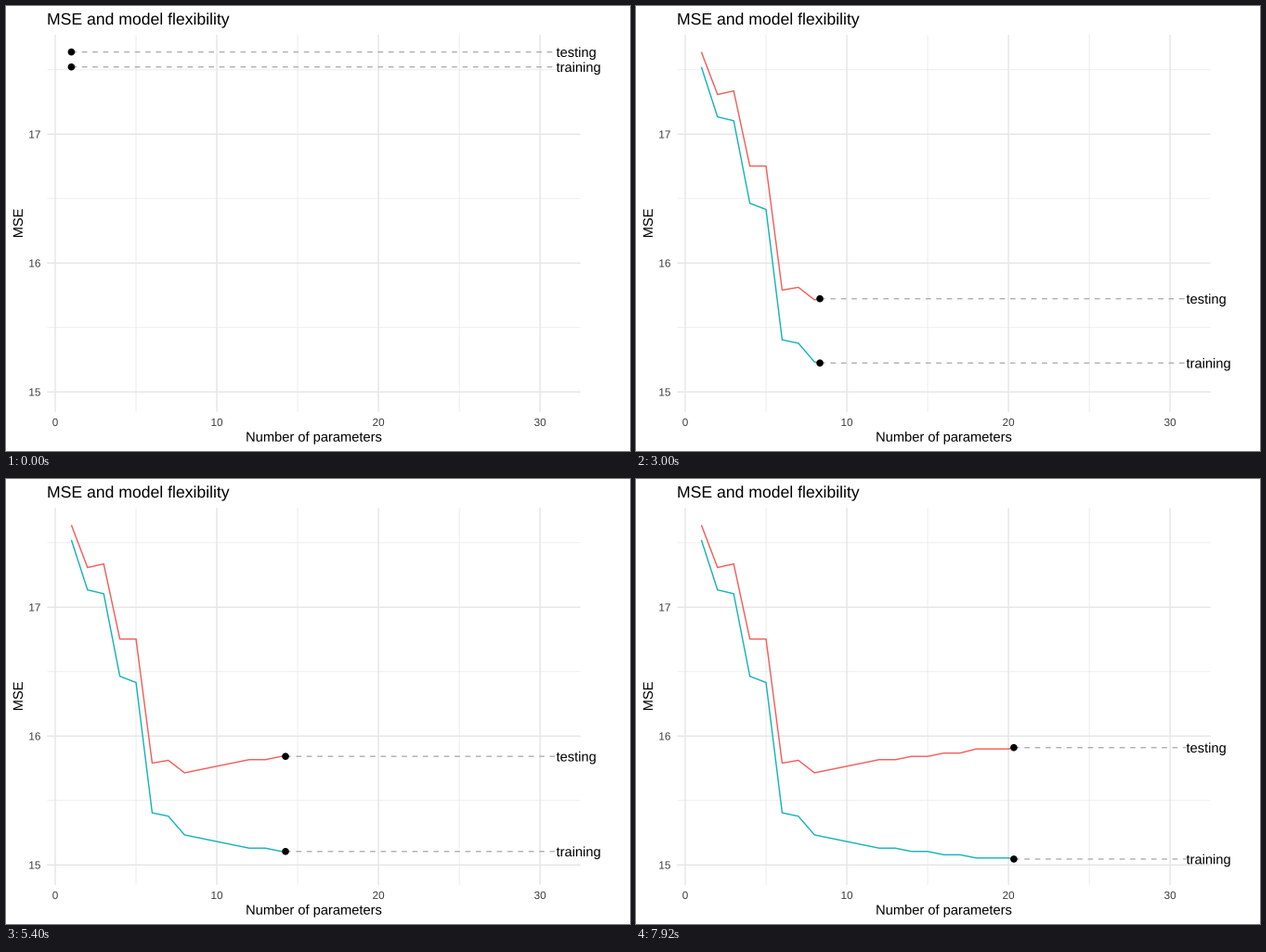
Write a matplotlib script that moves like this. It is 672 by 480 pixels and loops after 8 s.

```python
import numpy as np
import matplotlib as mpl
import matplotlib.pyplot as plt
from matplotlib.animation import FuncAnimation
from matplotlib.patches import Circle, PathPatch
from matplotlib.textpath import TextPath
from matplotlib.transforms import Affine2D

W, H, DPI = 672, 480, 96
LEFT, RIGHT, TOP, BOTTOM = 44.3, 618.67, 31, 437.8
GRID, DASH, TICK = "#e6e6e6", "#b0b0b0", "#3d3d3d"
RED, TEAL = "#f35e5a", "#17b3b7"
STROKE = 1.067  # points
BODY, TITLE, SMALL = 14.67, 17.6, 11.73  # text sizes in pixels
LABEL_X = 31

STEPS, STEP_MS, LOOP_MS, INTERVAL = 100, 120, 8000, 40

mpl.rcParams.update({
    "font.family": "Liberation Sans",
    "lines.dash_capstyle": "butt",
    "lines.solid_capstyle": "butt",
    "lines.solid_joinstyle": "miter",
})

params = np.arange(1, 22)
# Each parameter count lands on a whole step; 30 of them share all steps.
knots = np.rint((params - 1) * (STEPS - 1) / 29)
# Beyond 12 parameters the fit improves only now and then, making plateaus.
level = np.minimum(params, 12 + (params - 10.9) // 2.3)

testing = np.interp(
    level, [1, 2, 3, 4, 5, 6, 7, 8, 14, 16],
    [17.638, 17.308, 17.336, 16.753, 16.753, 15.790, 15.812, 15.715,
     15.868, 15.932])
gap = np.interp(level, [1, 4, 8, 14, 16], [0.116, 0.289, 0.482, 0.789, 0.903])


def px(n):
    return 53 + 17.405 * np.asarray(n)


def py(v):
    return 138.3 + 139 * (17 - np.asarray(v))


fig = plt.figure(figsize=(W / DPI, H / DPI), dpi=DPI, facecolor="white")
ax = fig.add_axes([0, 0, 1, 1])
ax.set_xlim(0, W)
ax.set_ylim(H, 0)
ax.axis("off")


def line(xs, ys, color, width=STROKE, **kw):
    return ax.plot(xs, ys, color=color, lw=width, snap=False, **kw)[0]


def advance(s, size):
    def right(t):
        return TextPath((0, 0), t, size=size).get_extents().xmax
    return right(s + "0") - right("0")


def place(x, y, angle=0):
    return Affine2D().scale(1, -1).rotate_deg(angle).translate(x, y) + ax.transData


def text(x, y, s, size=BODY, align=0, color="black", angle=0):
    """Outline text on a baseline; align 0 is left, 0.5 centre, 1 right."""
    start = -align * advance(s, size)
    glyphs = PathPatch(TextPath((start, 0), s, size=size), fc=color, lw=0,
                       snap=False, zorder=5, transform=place(x, y, angle))
    return ax.add_artist(glyphs)


def draw_grid():
    # Minor lines sit halfway between the major ones.
    for n in range(0, 31, 5):
        width = STROKE / 2 if n % 10 else STROKE
        line([px(n)] * 2, [TOP, BOTTOM], GRID, width, zorder=1 + width)
    for v in np.arange(15, 18, 0.5):
        width = STROKE / 2 if v % 1 else STROKE
        line([LEFT, RIGHT], [py(v)] * 2, GRID, width, zorder=1 + width)


def draw_labels():
    for n in range(0, 31, 10):
        text(px(n), 453, str(n), SMALL, 0.5, TICK)
    for v in range(15, 18):
        text(37.4, py(v) + 4.2, str(v), SMALL, 1, TICK)
    text(LEFT - 0.3, 20, "MSE and model flexibility", TITLE)
    text((LEFT + RIGHT) / 2, 469.7, "Number of parameters", align=0.5)
    text(17.9, (TOP + BOTTOM) / 2, "MSE", align=0.5, angle=-90)


class Trace:
    def __init__(self, name, color, values):
        self.values = values
        self.guide = line([], [], DASH, linestyle=(0, (4, 4)), zorder=3)
        self.path = line([], [], color, zorder=4)
        self.dot = ax.add_patch(Circle((0, 0), 3.8, fc="black", lw=0, zorder=5))
        self.label = text(0, 0, name)

    def update(self, step):
        x = px(np.interp(step, knots, params))
        y = py(np.interp(step, knots, self.values))
        done = knots < step
        self.path.set_data(np.append(px(params[done]), x),
                           np.append(py(self.values[done]), y))
        self.guide.set_data([x, px(LABEL_X)], [y, y])
        self.dot.center = x, y
        self.label.set_transform(place(px(LABEL_X), y + 5.3))


draw_grid()
draw_labels()
traces = [Trace("testing", RED, testing), Trace("training", TEAL, testing - gap)]


def update(frame):
    step = frame * INTERVAL // STEP_MS
    for trace in traces:
        trace.update(step)
    return []


anim = FuncAnimation(fig, update, frames=LOOP_MS // INTERVAL,
                     interval=INTERVAL, repeat=True, repeat_delay=0,
                     init_func=lambda: update(0))
plt.show()
```
